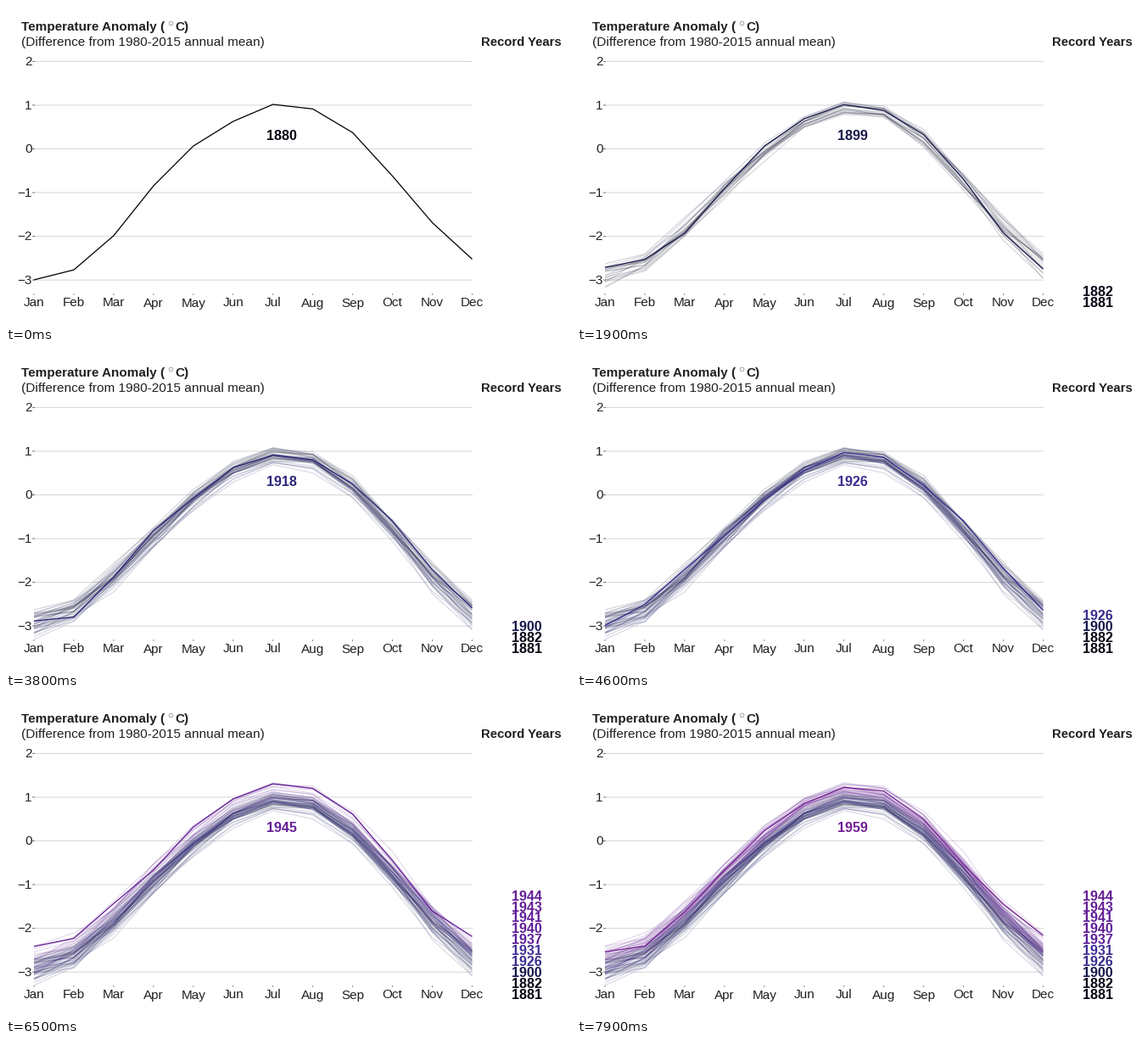
Write a matplotlib script that moves like this. It is 666 px wide and 375 px high and loops after 8 s.

```python
import numpy as np
import matplotlib.pyplot as plt
from matplotlib.animation import FuncAnimation

W, H, DPI = 666, 375, 100
PX = 72 / DPI
FIRST, COUNT = 1880, 80
X0, STEP, ZERO, DEGREE = 33, 46.95, 168.5, 51.55
MONTHS = "Jan Feb Mar Apr May Jun Jul Aug Sep Oct Nov Dec".split()
RECORDS = [1881, 1882, 1900, 1926, 1931, 1937, 1940, 1941, 1943, 1944]

# Long-term trend: key years and their annual anomaly
TREND = [(1880, -.15), (1890, -.30), (1900, -.15), (1909, -.45), (1915, -.27),
         (1926, -.22), (1934, -.13), (1944, .17), (1950, -.10), (1960, .04)]

# Line colour by year: black, navy, blue, violet, purple
RAMP = [(1880, (5, 5, 16)), (1910, (31, 32, 104)), (1931, (62, 48, 152)),
        (1935, (91, 30, 153)), (1960, (115, 32, 145))]


def color(year):
    stops, tints = zip(*RAMP)
    return tuple(np.interp(year, stops, channel) / 255 for channel in zip(*tints))


def y_of(temp):
    return ZERO - DEGREE * temp


# Two harmonics give the seasonal cycle; winters vary more than summers
phase = np.arange(12) * np.pi / 6
season = (-.884 - 1.933 * np.cos(phase) - .082 * np.sin(phase)
          - .073 * np.cos(2 * phase) + .085 * np.sin(2 * phase))
spread = .09 + .045 * np.cos(phase)


def monthly(year):
    rng = np.random.default_rng(year)
    level = np.interp(year, *zip(*TREND)) + .2 + np.clip(rng.normal(0, .05), -.08, .08)
    noise = rng.normal(size=12)
    noise = np.clip(.9 * noise + .4 * np.roll(noise, 1), -1.9, 1.9)
    return np.clip(season + level + spread * noise, -3.32, 1.38)


plt.rcParams["font.family"] = "Liberation Sans"
fig = plt.figure(figsize=(W / DPI, H / DPI), dpi=DPI, facecolor="white")
ax = fig.add_axes([0, 0, 1, 1])
ax.set_xlim(0, W)
ax.set_ylim(H, 0)
ax.axis("off")


def label(x, y, text, size, ha="left", bold=False, tint="#231f20"):
    return ax.text(x, y, text, fontsize=size * PX, ha=ha, va="baseline",
                   weight="bold" if bold else "normal", color=tint, zorder=5)


def stroke(xs, ys, tint, width=1, z=1):
    return ax.plot(xs, ys, color=tint, lw=width * PX, zorder=z, snap=False,
                   solid_capstyle="butt", solid_joinstyle="round")[0]


label(18, 28.5, "Temperature Anomaly (", 15.3, bold=True)
label(199.5, 28.5, "C)", 15.3, bold=True)
ax.add_patch(plt.Circle((194.5, 20.5), 2.4, fill=False, ec="#777777", lw=.6 * PX))
label(18, 46.5, "(Difference from 1980-2015 annual mean)", 15.4)
label(560, 47, "Record Years", 14.9, bold=True)

for t in range(-3, 3):
    y = y_of(t)
    stroke([X0, 550], [y, y], "#d6d6d8")
    stroke([31, 34], [y, y], "#777777")
    label(30.5, y + 4.7, str(t).replace("-", "\u2212"), 15.3, "right")

xs = X0 + STEP * np.arange(12)
for x, name in zip(xs, MONTHS):
    stroke([x, x], [339, 341], "#888888")
    label(x, 354.5, name, 15.2, "center")

years = range(FIRST, FIRST + COUNT)
lines = [stroke(xs, y_of(monthly(year)), color(year)) for year in years]
current = label(325, 158.5, "", 16.1, "center", True)
records = [label(614, 354.7 - 12.9 * k, str(year), 16.1, "center", True, color(year))
           for k, year in enumerate(RECORDS)]


def update(n):
    year = FIRST + n
    for k, line in enumerate(lines):
        newest = k == n
        line.set_visible(k <= n)
        line.set_alpha(1 if newest else .18)
        line.set_linewidth((1.3 if newest else 1.1) * PX)
        line.set_zorder(4 if newest else 2)
    current.set_text(str(year))
    current.set_color(color(year))
    for record, text in zip(RECORDS, records):
        text.set_visible(record <= year)
    return [*lines, current, *records]


anim = FuncAnimation(fig, update, frames=COUNT, interval=100,
                     repeat=True, repeat_delay=0, blit=False)
plt.show()
```
